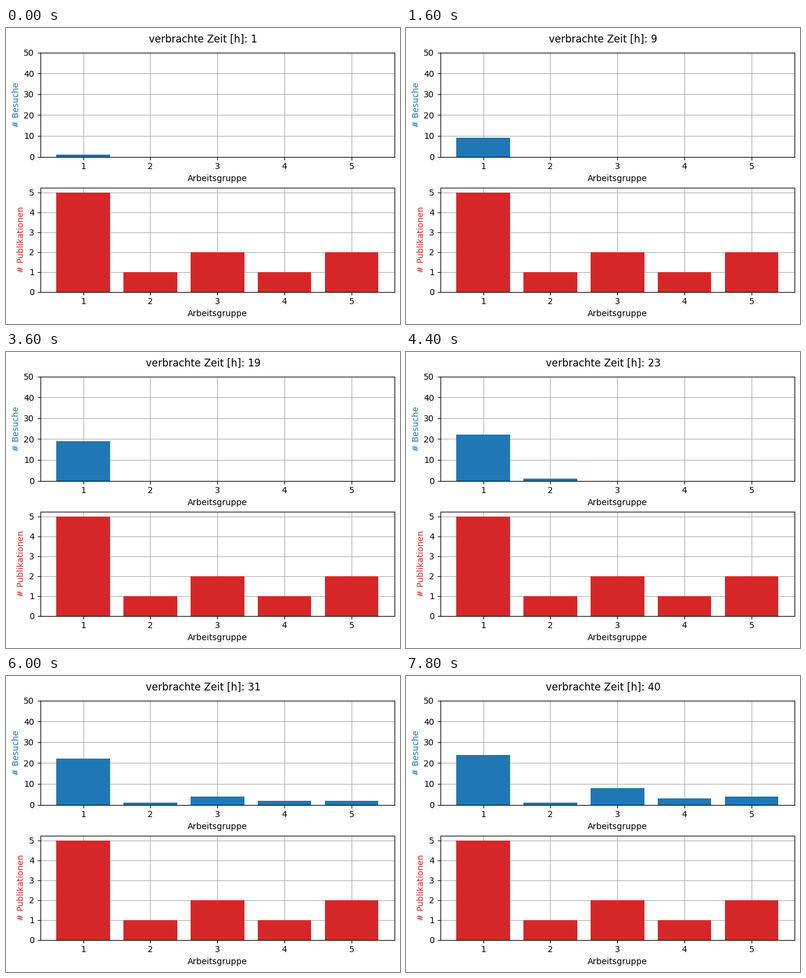
These frames come from a looping animation (651 px wide and 491 px high, 8000 ms). A matplotlib script:

```python
import numpy as np
import matplotlib.pyplot as plt
from matplotlib.animation import FuncAnimation

W, H, DPI = 651, 491, 100
LEFT, RIGHT = 56.6, 641.8
GROUPS = np.arange(1, 6)
PAPERS = [5, 1, 2, 1, 2]

# Group visited in each hour of the random walk
WALK = [int(c) for c in "1" * 20 + "211" + "55" + "4334" + "3" * 6 + "45" + "151"]

plt.rcParams["font.family"] = "DejaVu Sans"
fig = plt.figure(figsize=(W / DPI, H / DPI), dpi=DPI, facecolor="white")


def add_panel(top, bottom, values, color, label, ymax):
    """Bar chart between two pixel rows counted from the top edge."""
    ax = fig.add_axes([LEFT / W, 1 - bottom / H,
                       (RIGHT - LEFT) / W, (bottom - top) / H])
    bars = ax.bar(GROUPS, values, color=color)
    ax.set_xlim(0.36, 5.64)
    ax.set_ylim(0, ymax)
    ax.set_xticks(GROUPS)
    ax.set_xlabel("Arbeitsgruppe")
    ax.set_ylabel(label, color=color)
    ax.set_axisbelow(True)
    ax.grid(True)
    return ax, bars


ax_visits, visit_bars = add_panel(40.6, 213.6, np.zeros(5), "tab:blue",
                                  "# Besuche", 50)
ax_papers, _ = add_panel(264.6, 437.6, PAPERS, "tab:red",
                         "# Publikationen", 5.25)
ax_visits.set_yticks(range(0, 51, 10))
ax_papers.set_yticks(range(6))
title = fig.suptitle("", fontsize=12, y=0.98)


def update(i):
    hours = i + 1
    visits = np.bincount(WALK[:hours], minlength=6)[1:]
    for bar, n in zip(visit_bars, visits):
        bar.set_height(n)
    title.set_text(f"verbrachte Zeit [h]: {hours}")
    return [*visit_bars, title]


anim = FuncAnimation(fig, update, frames=len(WALK), interval=200,
                     repeat=True, repeat_delay=0, blit=False)
plt.show()
```
